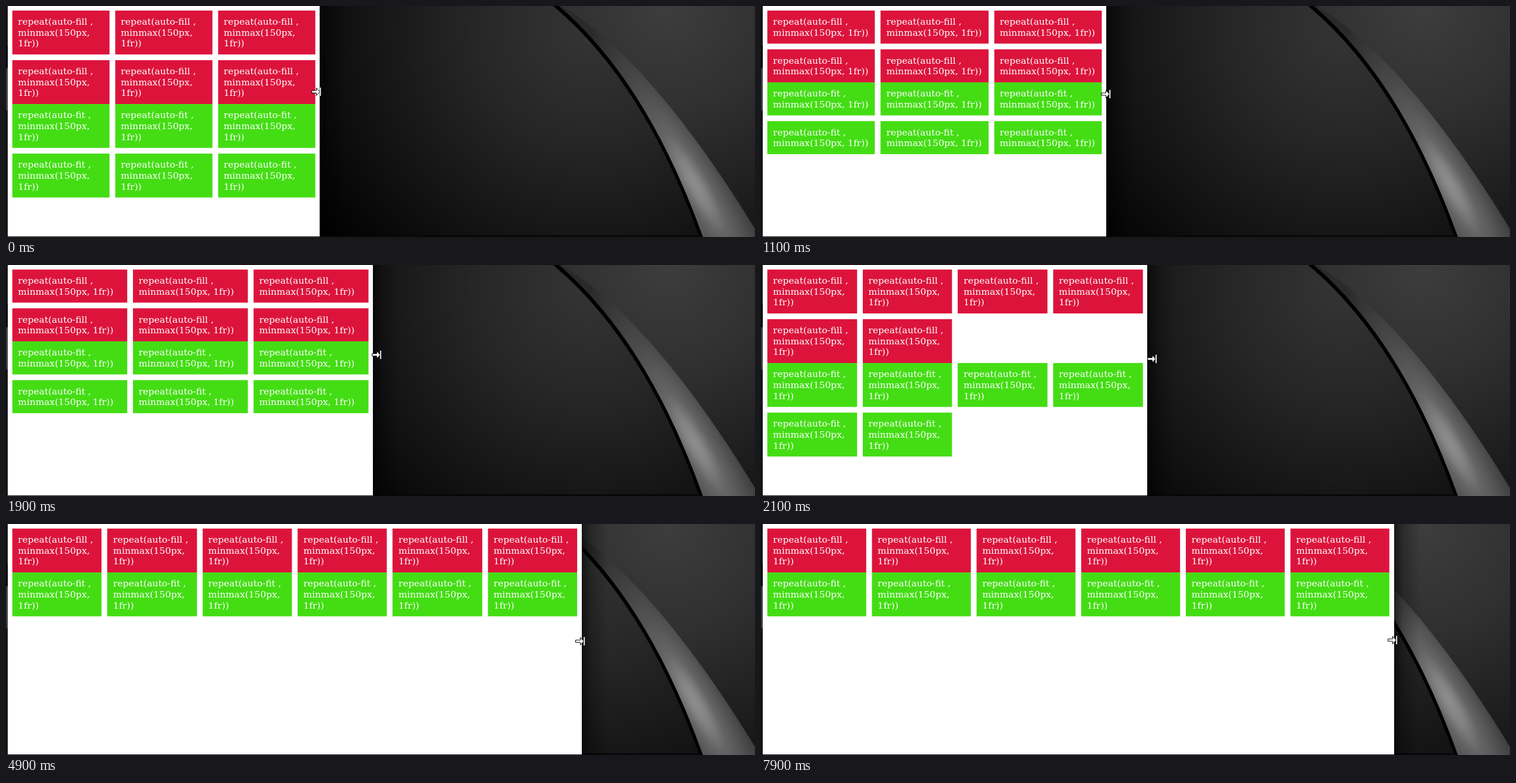
Recreate the animation shown at these times as an HTML page. Size 1280 px wide and 396 px high, loop 8 s.

```html
<!DOCTYPE html>
<html lang="en">
<head>
<meta charset="utf-8">
<title>auto-fill and auto-fit</title>
<style>
html, body { margin: 0; width: 100%; height: 100%; overflow: hidden; background: #111; }
#stage { position: relative; width: 1280px; height: 396px; overflow: hidden; }
#stage > svg { position: absolute; left: 0; top: 0; }
#win {
  position: absolute; left: 3px; top: 0; height: 395px; overflow: hidden;
  background: #fff;
}
#shade {
  position: absolute; top: 0; width: 44px; height: 396px;
  background: linear-gradient(90deg, rgba(0,0,0,.6), rgba(0,0,0,.25) 35%, transparent);
}
#page {
  box-sizing: border-box; padding: 8px; transform-origin: 0 0;
  font: 16px/19px "DejaVu Serif", serif; color: #fff;
}
.grid { display: grid; gap: 10px; }
.fill { grid-template-columns: repeat(auto-fill, minmax(150px, 1fr)); }
.fit { grid-template-columns: repeat(auto-fit, minmax(150px, 1fr)); }
.grid div { padding: 10px; }
.fill div { background: #dc143c; }
.fit div { background: #44dd14; }
</style>
</head>
<body>
<div id="stage">
  <svg width="1280" height="396">
    <defs>
      <radialGradient id="dusk" gradientUnits="userSpaceOnUse" cx="1000" cy="30" r="580">
        <stop offset="0" stop-color="#353535"/>
        <stop offset=".35" stop-color="#262626"/>
        <stop offset=".7" stop-color="#121212"/>
        <stop offset="1" stop-color="#000"/>
      </radialGradient>
      <radialGradient id="corner" gradientUnits="userSpaceOnUse" cx="1130" cy="0" r="400">
        <stop offset="0" stop-color="#3d3d3d"/>
        <stop offset=".45" stop-color="#303030"/>
        <stop offset="1" stop-color="#181818"/>
      </radialGradient>
      <radialGradient id="gloss" gradientUnits="userSpaceOnUse" cx="0" cy="0" r="1"
        gradientTransform="translate(1177 305) rotate(-30) scale(75 330)">
        <stop offset="0" stop-color="#8e8e8e"/>
        <stop offset=".13" stop-color="#828282"/>
        <stop offset=".3" stop-color="#646464"/>
        <stop offset=".6" stop-color="#4a4a4a"/>
        <stop offset="1" stop-color="#2a2a2a"/>
      </radialGradient>
    </defs>
    <rect width="1280" height="396" fill="url(#dusk)"/>
    <path d="M945 0Q1105 95 1280 382V0Z" fill="url(#corner)"/>
    <path d="M945 0H950Q1105 95 1280 382V396H1190Q1096 130 945 0Z" fill="url(#gloss)"/>
    <path d="M935 0Q1090 130 1185 396H1191Q1096 130 945 0L953 0Z"/>
    <path d="M0 394.5H1187" stroke="#0b0507" stroke-width="3"/>
    <path d="M0 0H3V396H0Z" fill="#171717"/>
    <path d="M0 68H3V106H0Z"/>
    <path d="M0 107H3V179H0Z" fill="#3c3c3c"/>
  </svg>
  <div id="shade"></div>
  <div id="win"><div id="page"></div></div>
  <svg width="1280" height="396">
    <g id="cursor" fill="#fff" stroke="#000">
      <path d="M.5-2H8.5V-6.5L14.5 0 8.5 6.5V2H.5Z"/>
      <path d="M14-7.5H16.5V7.5H14Z" stroke-width=".6"/>
    </g>
  </svg>
</div>
<script>
const $ = id => document.getElementById(id);
const SCALE = .977, LOOP = 8000, STEP = 100;

// time, right edge of the window, cursor x, cursor y
const keys = [
  [0, 536, 522, 147], [400, 536, 525, 154], [800, 536, 525, 154],
  [1100, 590, 581, 151], [1400, 619, 612, 153], [1700, 619, 612, 153],
  [1900, 627, 625, 154], [2400, 710, 712, 171], [4800, 710, 712, 171],
  [4900, 984, 973, 201], [6900, 984, 973, 201],
  [7000, 997.5, 988, 190], [7100, 997.5, 988, 190],
  [7200, 998, 988, 190], [7800, 998, 988, 190], [7900, 1081.6, 1071, 199]
];

$('page').innerHTML = ['fill', 'fit'].map(kind =>
  `<div class="grid ${kind}">` +
  `<div>repeat(auto-${kind} , minmax(150px, 1fr))</div>`.repeat(6) + '</div>'
).join('');
$('page').style.transform = `scale(${SCALE})`;

function pose(t) {
  const i = keys.findIndex(k => k[0] > t);
  if (i < 0) return keys[keys.length - 1];
  const a = keys[i - 1], b = keys[i], p = (t - a[0]) / (b[0] - a[0]);
  return a.map((v, j) => v + (b[j] - v) * p);
}

function draw(now) {
  const t = Math.floor(now % LOOP / STEP) * STEP;
  const [, edge, x, y] = pose(t);
  $('win').style.width = edge - 3 + 'px';
  $('page').style.width = (edge - 3) / SCALE + 'px';
  $('shade').style.left = edge + 'px';
  $('cursor').setAttribute('transform', `translate(${Math.round(x)} ${Math.round(y)})`);
}

const start = performance.now();
function tick() {
  draw(performance.now() - start);
  requestAnimationFrame(tick);
}
tick();
</script>
</body>
</html>
```
